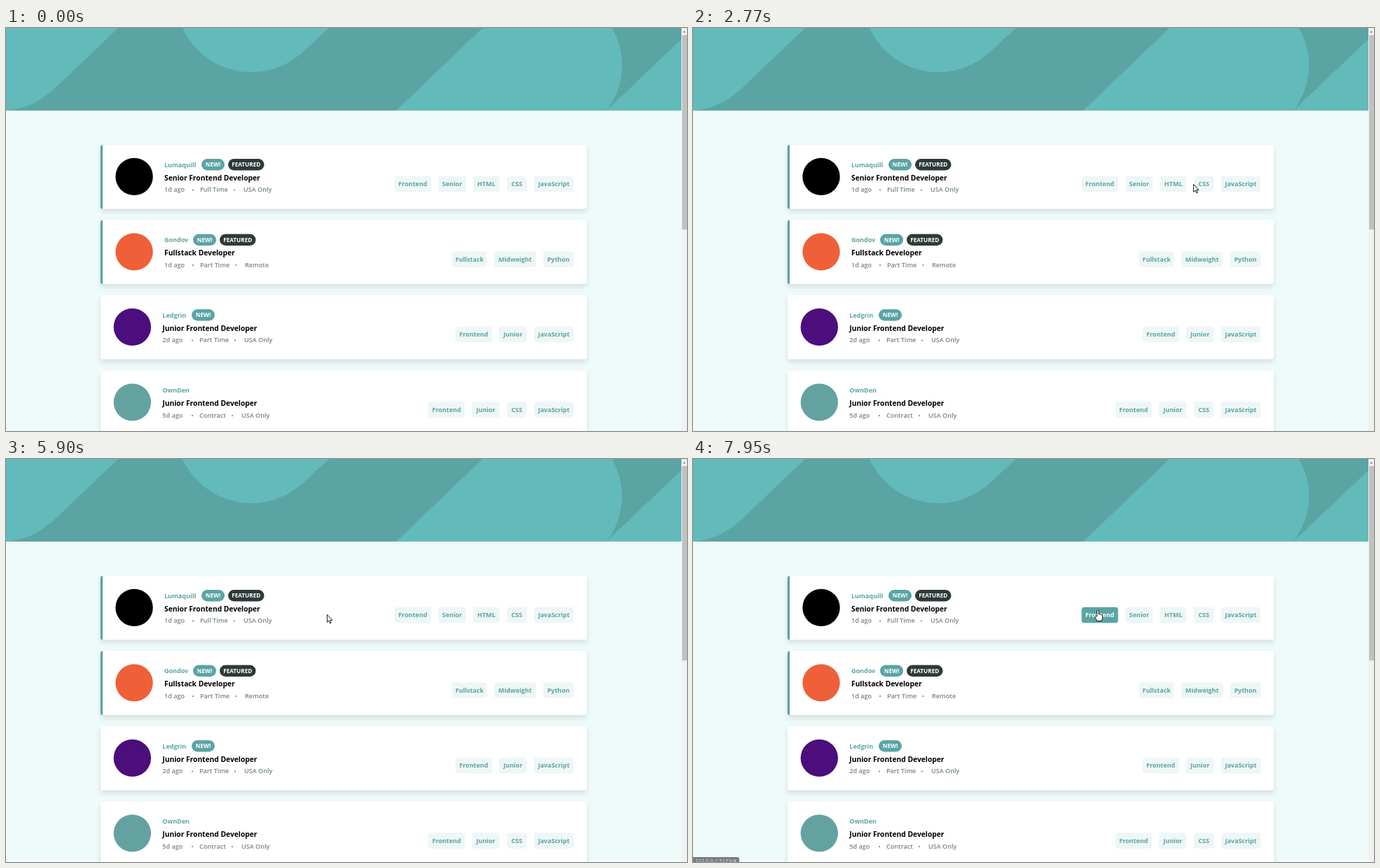
These frames come from a looping animation (972 px wide and 576 px high, 8000 ms). An HTML page:

```html
<!DOCTYPE html>
<html lang="en">
<head>
<meta charset="utf-8">
<title>Job listings</title>
<style>
html, body { margin: 0; width: 100%; height: 100%; overflow: hidden; background: #effafa; }
svg { display: block; font-family: 'Open Sans', 'Noto Sans', sans-serif; }
.card { filter: drop-shadow(0 4px 3.5px rgba(0, 0, 0, .11)); }
.company { font-size: 9px; font-weight: 700; fill: #5ba4a4; }
.title { font-size: 10.25px; font-weight: 700; }
.title.on { fill: #5ba4a4; }
.meta { font-size: 9.1px; font-weight: 600; fill: #748585; }
.pill { font-size: 8.2px; font-weight: 700; fill: #fff; text-anchor: middle; }
.tag { font-size: 9px; font-weight: 700; text-anchor: middle; }
.tag rect { fill: #eef6f6; }
.tag text { fill: #5ba4a4; }
.tag.on rect { fill: #5ba4a4; }
.tag.on text { fill: #fff; }
.cursor path { fill: #fff; stroke: #000; stroke-width: .9; stroke-linejoin: round; }
</style>
</head>
<body>
<svg width="972" height="576" viewBox="0 0 972 576">
  <rect width="964" height="118" fill="#5ba4a4"/>
  <g fill="#63baba">
    <path d="M0 0H160L73 83C52 103 30 116 0 118Z"/>
    <path d="M252 0A108 108 0 0 0 425 33L461 0Z"/>
    <path d="M680 0L557 118H857A106 106 0 0 0 865 0Z"/>
    <path d="M964 16L857 118H964Z"/>
  </g>
  <g id="list"></g>
  <rect x="964" width="8" height="576" fill="#f1f1f1"/>
  <path d="M966 6.5L968.2 4L970.4 6.5Z" fill="#8a8a8a"/>
  <rect x="965" y="10" width="7" height="278" fill="#c1c1c1"/>
  <g id="status">
    <path d="M0 569H63Q66 569 66 572V576H0Z" fill="#484d52"/>
    <text x="3" y="577" font-size="7.6" fill="#d5d8da">127.0.0.1:5173/#</text>
  </g>
  <g id="cursor" class="cursor">
    <path id="arrow" d="M.4 .5V11.3L2.8 9 4.6 12.9 6.2 12.2 4.5 8.4H7.8Z"/>
    <path id="hand" d="M-1.4 9V1.4a1.3 1.3 0 0 1 2.6 0V6q1.4-.8 2.1.4q1.3-.6 1.9.5q1.3-.2 1.3 1.2V11.5q0 1.4-1 2.6V15.6H-1.7V14.3L-4.2 10.4q-.7-1.4.4-1.8q.9-.2 1.6.8Z"/>
  </g>
</svg>
<script>
const $ = id => document.getElementById(id);

const tagWidth = {
  Frontend: 52, Senior: 39.5, Junior: 39.5, HTML: 37.8, CSS: 28.5,
  JavaScript: 56.5, Fullstack: 49.8, Midweight: 59.5, Python: 43.5
};
// x: text left; meta: x of first dot, second item, second dot, third item
const jobs = [
  { company: 'Lumaquill', logo: '#000', title: 'Senior Frontend Developer', x: 226, fresh: 279, featured: 317,
    info: ['1d ago', 'Full Time', 'USA Only'], meta: [267, 277, 326, 339],
    tags: ['Frontend', 'Senior', 'HTML', 'CSS', 'JavaScript'] },
  { company: 'Gondov', logo: '#ef6039', title: 'Fullstack Developer', x: 226, fresh: 267, featured: 305,
    info: ['1d ago', 'Part Time', 'Remote'], meta: [267, 277, 328.5, 341],
    tags: ['Fullstack', 'Midweight', 'Python'] },
  { company: 'Ledgrin', logo: '#4b0e7c', title: 'Junior Frontend Developer', x: 223.3, fresh: 265,
    info: ['2d ago', 'Part Time', 'USA Only'], meta: [266, 276, 327, 340],
    tags: ['Frontend', 'Junior', 'JavaScript'] },
  { company: 'OwnDen', logo: '#64a2a2', title: 'Junior Frontend Developer', x: 223.3,
    info: ['5d ago', 'Contract', 'USA Only'], meta: [266, 276, 323, 336],
    tags: ['Frontend', 'Junior', 'CSS', 'JavaScript'] }
];

const text = (cls, x, y, s) => `<text class="${cls}" x="${x}" y="${y}">${s}</text>`;
const dot = x => `<circle cx="${x}" cy="231.5" r="1.1" fill="#748585"/>`;
const pill = (x, w, fill, s) => x
  ? `<rect x="${x}" y="187" width="${w}" height="16.4" rx="8.2" fill="${fill}"/>` + text('pill', x + w / 2, 198.3, s)
  : '';

function tagRow(tags) {
  let right = 810.2;
  return [...tags].reverse().map(name => {
    const w = tagWidth[name], x = right - w;
    right = x - 10.3;
    return `<g class="tag" data-x="${x}" data-w="${w}"><rect x="${x}" y="211.8" width="${w}" height="22.4" rx="3.5"/>` +
      text('', x + w / 2, 226.3, name) + '</g>';
  }).join('');
}

$('list').innerHTML = jobs.map((j, i) => {
  const [d1, x2, d2, x3] = j.meta;
  return `<g transform="translate(0 ${i * 107.5})">
    <rect class="card" x="135" y="167" width="694" height="91.5" rx="3.5" fill="#fff"/>
    ${j.featured ? '<path d="M138 167Q134.8 167 134.8 170.5V255Q134.8 258.5 138 258.5Z" fill="#5ba4a4"/>' : ''}
    <circle cx="${j.x - 43}" cy="212.4" r="26.7" fill="${j.logo}"/>
    ${text('company', j.x, 198.5, j.company)}
    ${pill(j.fresh, 33, '#5ba4a4', 'NEW!')}${pill(j.featured, 51.5, '#2c3a3a', 'FEATURED')}
    ${text('title', j.x, 217.6, j.title)}
    ${text('meta', j.x, 234.4, j.info[0])}${dot(d1)}${text('meta', x2, 234.4, j.info[1])}
    ${dot(d2)}${text('meta', x3, 234.4, j.info[2])}
    ${tagRow(j.tags)}</g>`;
}).join('');

const topCard = $('list').firstElementChild;
const topTitle = topCard.querySelector('.title');
const topTags = [...topCard.querySelectorAll('.tag')];

// Mouse moves: first step at, last step at, steps, end x, end y
const moves = [
  [580, 1340, 12, 808, 243],
  [1410, 1550, 3, 781, 224],
  [1810, 1810, 1, 783, 223],
  [2010, 2150, 3, 761, 228],
  [2220, 2770, 8, 714, 223],
  [2840, 3260, 7, 685, 223],
  [3790, 4140, 6, 629, 226],
  [4540, 5030, 8, 586, 228],
  [5620, 6380, 12, 349, 217],
  [6580, 6580, 1, 349, 215],
  [6650, 6780, 3, 348, 216],
  [7390, 7950, 9, 578, 216]
];
const easeOut = u => u * (1.5 - u / 2);

function mouseAt(t) {
  let x = 968, y = 566;
  for (const [start, end, n, toX, toY] of moves) {
    if (t < start) break;
    const step = n > 1 ? Math.floor((t - start) / (end - start) * (n - 1) + 1e-6) + 1 : 1;
    const u = easeOut(Math.min(1, step / n));
    x += (toX - x) * u;
    y += (toY - y) * u;
  }
  return [Math.round(x), Math.round(y)];
}

function draw() {
  const t = performance.now() % 8000;
  const [x, y] = mouseAt(t);
  const shown = t >= 580;
  const onTitle = shown && x >= 226 && x <= 363 && y >= 207 && y <= 221;
  let link = onTitle;
  topTitle.classList.toggle('on', onTitle);
  for (const tag of topTags) {
    const left = +tag.dataset.x;
    const on = shown && y >= 212 && y <= 234 && x >= left && x <= left + +tag.dataset.w;
    tag.classList.toggle('on', on);
    link = link || on;
  }
  $('cursor').setAttribute('transform', `translate(${x} ${y})`);
  $('cursor').style.display = shown ? '' : 'none';
  $('hand').style.display = link ? '' : 'none';
  $('arrow').style.display = link ? 'none' : '';
  // The address bubble starts to fade once the pointer has left the title
  $('status').style.opacity = t < 6580 ? 0 : Math.min(1, 1 - (t - 7880) / 250);
  requestAnimationFrame(draw);
}
draw();
</script>
</body>
</html>
```
